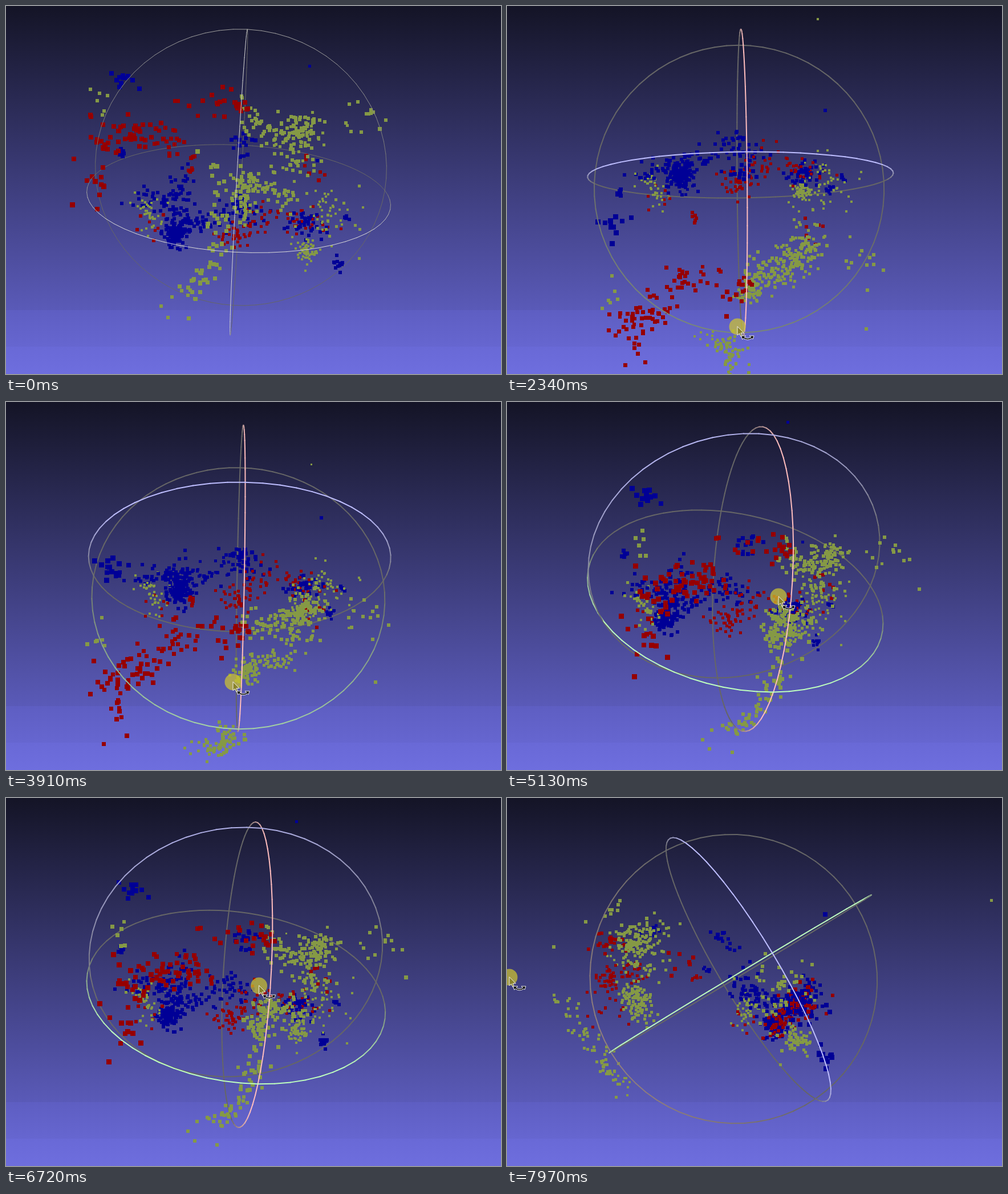
An HTML page with a canvas that plays this animation: 868x645 px, repeating every 8 s.

```html
<!DOCTYPE html>
<html lang="en">
<head>
<meta charset="utf-8">
<title>Rotating point cloud</title>
<style>
  html, body { margin: 0; width: 100%; height: 100%; overflow: hidden; background: #141426; }
  canvas { display: block; width: 868px; height: 645px; }
</style>
</head>
<body>
<canvas id="stage" width="868" height="645"></canvas>
<script>
const ctx = document.getElementById('stage').getContext('2d');
const W = 868, H = 645, LOOP = 8000;
const CX = 409.5, CY = 309, FOCAL = 254, DEPTH = 0.324;
const ENTER = 70, PRESS = 750, DRAG = 1010;
const GRAB = { x: 394, y: 247 };
const BLUE = { color: '#000096', size: 6.4 };
const RED = { color: '#960000', size: 5.6 };
const OLIVE = { color: '#859945', size: 4.5 };

const rad = deg => deg * Math.PI / 180;
const mix = (a, b, f) => a + (b - a) * f;
const clamp = v => Math.min(1, Math.max(0, v));
const smoothstep = (from, to, v) => {
  const f = clamp((v - from) / (to - from));
  return f * f * (3 - 2 * f);
};

// Cursor path: time, x, y
const path = [
  [ENTER, 805, 605], [540, GRAB.x, GRAB.y], [DRAG, GRAB.x, GRAB.y],
  [1460, 397, 380], [2340, 404, 562], [2680, 404, 573], [3560, 404, 573],
  [3910, 398, 491], [4430, 405, 380], [5130, 476, 341], [5980, 555, 345],
  [6150, 555, 345], [6720, 444, 329], [7740, 18, 314], [7970, 4, 314]
];
function cursorAt(t) {
  const next = path.findIndex(key => key[0] > t);
  const i = next < 0 ? path.length - 1 : Math.max(1, next);
  const a = path[i - 1], b = path[i];
  const f = clamp((t - a[0]) / (b[0] - a[0]));
  return { x: mix(a[1], b[1], f), y: mix(a[2], b[2], f) };
}

// Arcball: a drag carries the grabbed spot on the sphere to the cursor.
const normalize = v => v.map(n => n / Math.hypot(...v));
const multiply = ([a, b, c, d], [e, f, g, h]) => [
  a * e - b * f - c * g - d * h, a * f + b * e + c * h - d * g,
  a * g - b * h + c * e + d * f, a * h + b * g - c * f + d * e
];
function turn(axis, deg) {
  const q = [Math.cos(rad(deg) / 2), 0, 0, 0];
  q[axis] = Math.sin(rad(deg) / 2);
  return q;
}
function onSphere({ x, y }) {
  const dx = x - CX, dy = CY - y, d = Math.hypot(dx, dy) || 1;
  const angle = rad(0.172 * d + 14 * smoothstep(170, 320, d));
  return [dx / d * Math.sin(angle), dy / d * Math.sin(angle), Math.cos(angle)];
}
function arc(from, to) {
  const [a, b, c] = onSphere(from), [x, y, z] = onSphere(to);
  return normalize([1 + a * x + b * y + c * z, b * z - c * y, c * x - a * z, a * y - b * x]);
}
const rest = multiply(multiply(turn(3, -3.2), turn(2, -0.8)), turn(1, -70.4));
const toMatrix = ([w, x, y, z]) => [
  [1 - 2 * (y * y + z * z), 2 * (x * y - w * z), 2 * (x * z + w * y)],
  [2 * (x * y + w * z), 1 - 2 * (x * x + z * z), 2 * (y * z - w * x)],
  [2 * (x * z - w * y), 2 * (y * z + w * x), 1 - 2 * (x * x + y * y)]
];
function project(matrix, p) {
  const [x, y, z] = matrix.map(r => r[0] * p[0] + r[1] * p[1] + r[2] * p[2]);
  const k = 1 - DEPTH * z;
  return { x: CX + FOCAL * x / k, y: CY - FOCAL * y / k, z, k };
}

let seed = 7;
function random() {
  seed = (seed + 0x6D2B79F5) | 0;
  let r = Math.imul(seed ^ seed >>> 15, 1 | seed);
  r = r + Math.imul(r ^ r >>> 7, 61 | r) ^ r;
  return ((r ^ r >>> 14) >>> 0) / 4294967296;
}
const noise = () => (random() + random() + random() - 1.5) * (0.9 + 2 * random());

// Scatters points around a polyline; a single knot gives a round blob.
const points = [];
function scatter(style, count, spread, ...knots) {
  for (let n = 0; n < count; n++) {
    const along = random() * (knots.length - 1), i = Math.floor(along);
    const from = knots[i], to = knots[i + 1] || from;
    points.push({ ...style, pos: from.map((v, j) => mix(v, to[j], along - i) + noise() * spread) });
  }
}

scatter(BLUE, 110, 0.045, [-0.46, 0.11, -0.48]);
scatter(BLUE, 118, 0.055, [-0.69, 0.12, -0.21], [-0.5, 0.12, -0.27], [-0.32, 0.25, -0.43],
  [-0.03, 0.38, -0.34], [0.12, 0.24, -0.32]);
scatter(BLUE, 32, 0.055, [-0.41, 0.04, 0], [-0.42, 0.1, -0.2]);
scatter(BLUE, 11, 0.06, [-0.68, -0.33, 0.68]);
scatter(BLUE, 6, 0.015, [-0.78, -0.08, 0.19]);
scatter(BLUE, 15, 0.03, [0, 0, 0.36], [0, 0.08, 0.17]);
scatter(BLUE, 45, 0.045, [0.41, 0.09, -0.31], [0.62, 0.14, -0.37]);
scatter(BLUE, 11, 0.025, [0.76, 0.03, -0.6]);
scatter(BLUE, 5, 0.015, [0.78, 0.07, -0.25]);
scatter(BLUE, 1, 0, [0.6, 1.6, 0.67]);
scatter(BLUE, 1, 0, [0.6, 0.5, 0.04]);

scatter(RED, 62, 0.055, [-0.28, -0.55, 0.38], [-0.48, -0.76, 0.5], [-0.65, -0.92, 0.46]);
scatter(RED, 18, 0.06, [-0.05, -0.66, 0.67], [-0.36, -0.59, 0.57]);
scatter(RED, 12, 0.07, [-0.64, -0.94, 0.3]);
scatter(RED, 8, 0.02, [0, -0.64, 0.64]);
scatter(RED, 88, 0.06, [-0.05, 0.01, -0.43], [0.04, 0.08, -0.42], [0.3, 0.25, -0.31], [0.6, 0.05, -0.33]);
scatter(RED, 6, 0.015, [-0.3, -0.25, 0.15]);
scatter(RED, 7, 0.06, [-0.6, -0.09, -0.34]);
scatter(RED, 7, 0.06, [0.44, -0.35, 0.24]);

scatter(OLIVE, 110, 0.038, [0.05, -0.73, 0.07], [0.04, -0.7, 0.28], [0.28, -0.62, 0.15]);
scatter(OLIVE, 125, 0.05, [0.01, -0.58, 0.59], [0.28, -0.52, 0.45], [0.37, -0.39, 0.48]);
scatter(OLIVE, 22, 0.06, [0.37, -0.39, 0.48], [0.73, -0.57, 0.65]);
scatter(OLIVE, 24, 0.06, [0.3, -0.54, 0.32]);
scatter(OLIVE, 60, 0.045, [0.53, -0.01, -0.49]);
scatter(OLIVE, 48, 0.1, [0.62, 0.02, -0.2]);
scatter(OLIVE, 36, 0.05, [-0.68, 0.12, -0.2], [-0.57, -0.1, -0.34]);
scatter(OLIVE, 70, 0.035, [-0.09, -1.12, 0.5], [-0.05, -1.08, 0.03], [-0.3, -1.08, -0.31]);
scatter(OLIVE, 6, 0.06, [-0.69, -0.68, 0.63]);
scatter(OLIVE, 1, 0, [0.67, 1.42, -0.4]);
scatter(OLIVE, 1, 0, [0.64, -0.88, 0.61]);

const backdrop = ctx.createLinearGradient(0, 0, 0, H);
[[0, '#141426'], [533, '#5a5ab8'], [533, '#5e5ec2'], [597, '#6666d0'], [597, '#6969d6'], [H, '#6e6ede']]
  .forEach(([y, color]) => backdrop.addColorStop(y / H, color));

const rings = [
  { tint: [255, 190, 190], at: (c, s) => [0, c, s] },
  { tint: [190, 255, 190], at: (c, s) => [c, s, 0] },
  { tint: [190, 190, 255], at: (c, s) => [c, 0, s] }
];
function drawRings(matrix, active, front) {
  const STEPS = 72;
  ctx.lineWidth = active ? 2 : 1;
  ctx.lineCap = 'round';
  for (const { tint, at } of rings) {
    const dots = Array.from({ length: STEPS + 1 }, (_, i) => {
      const angle = i / STEPS * 2 * Math.PI;
      return project(matrix, at(Math.cos(angle), Math.sin(angle)));
    });
    for (let i = 0; i < STEPS; i++) {
      const a = dots[i], b = dots[i + 1], z = (a.z + b.z) / 2;
      if (z > 0 !== front) continue;
      const color = (active ? tint : [215, 215, 215]).map(v => Math.round(mix(102, v, clamp(z * 1.5))));
      ctx.strokeStyle = `rgb(${color})`;
      ctx.beginPath();
      ctx.moveTo(a.x, a.y);
      ctx.lineTo(b.x, b.y);
      ctx.stroke();
    }
  }
}

function drawPoints(matrix) {
  points
    .map(p => ({ ...p, ...project(matrix, p.pos) }))
    .sort((a, b) => b.k - a.k)
    .forEach(({ x, y, k, size, color }) => {
      const side = Math.round(size / k);
      ctx.fillStyle = color;
      ctx.fillRect(Math.round(x - side / 2), Math.round(y - side / 2), side, side);
    });
}

const arrow = new Path2D('M0 0V15L3.5 11.8L6.2 17.5L8.6 16.4L6 11H11Z');
const orbit = new Path2D('M7 16H15L12 18.5Q18 22 24 18.5L21 16H29L27 22L25.5 20.5Q18 25.5 10.5 20.5L9 22Z');
function drawCursor({ x, y }, pressed) {
  ctx.save();
  ctx.translate(x, y);
  if (pressed) {
    ctx.fillStyle = 'rgba(210, 200, 45, 0.7)';
    ctx.beginPath();
    ctx.arc(0, 0, 14.5, 0, 2 * Math.PI);
    ctx.fill();
  }
  ctx.lineWidth = 1;
  ctx.strokeStyle = '#eee';
  ctx.fillStyle = pressed ? '#88822a' : '#111';
  ctx.fill(arrow);
  ctx.stroke(arrow);
  ctx.fillStyle = '#111';
  ctx.fill(orbit);
  ctx.stroke(orbit);
  ctx.restore();
}

function draw(t) {
  const cursor = cursorAt(t), active = t >= DRAG;
  const matrix = toMatrix(active ? multiply(arc(GRAB, cursor), rest) : rest);
  ctx.fillStyle = backdrop;
  ctx.fillRect(0, 0, W, H);
  drawRings(matrix, active, false);
  drawPoints(matrix);
  drawRings(matrix, active, true);
  if (t >= ENTER) drawCursor(cursor, t >= PRESS);
}

const start = performance.now();
function tick() {
  draw((performance.now() - start) % LOOP);
  requestAnimationFrame(tick);
}
tick();
</script>
</body>
</html>
```
